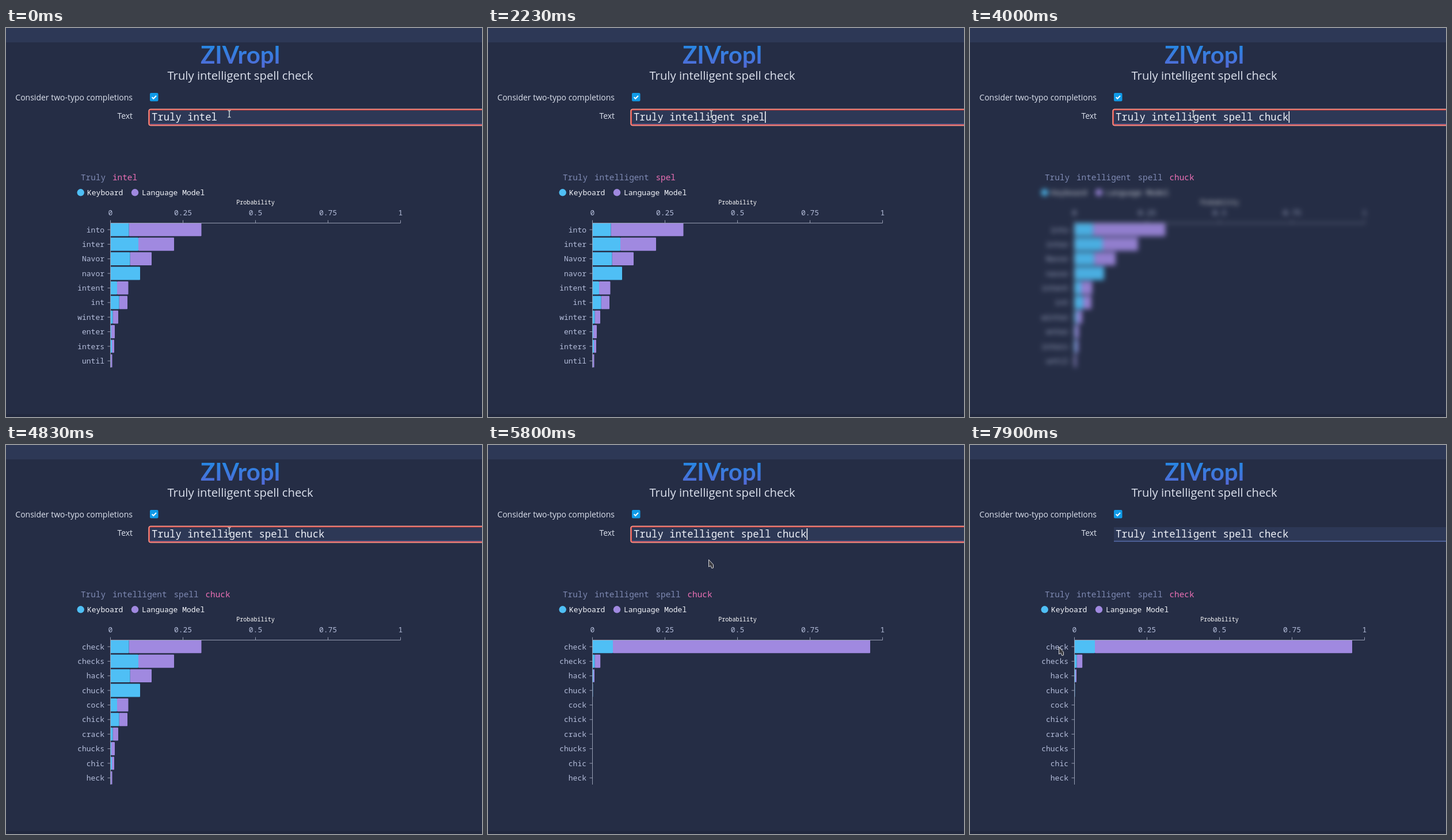
These frames come from a looping animation (827x677 px, 8000 ms). An HTML page:

```html
<!DOCTYPE html>
<html lang="en">
<head>
<meta charset="utf-8">
<title>Spell check demo</title>
<style>
  html, body { margin: 0; width: 100%; height: 100%; overflow: hidden; background: #252d45; }
  svg { display: block; width: 827px; height: 677px; }
  text { white-space: pre; }
  .sans { font-family: "Open Sans", "Noto Sans", sans-serif; fill: #dde2ee; }
  .mono { font-family: "Noto Sans Mono", "DejaVu Sans Mono", monospace; }
  .axis { font-size: 13px; fill: #b5bedb; }
  .legend { font-size: 13px; fill: #f3f5fb; }
  .rule { stroke: #969db2; fill: none; }
</style>
</head>
<body>
<svg viewBox="0 0 827 677">
  <defs>
    <linearGradient id="titleFill" gradientUnits="userSpaceOnUse" x1="0" y1="30" x2="0" y2="70">
      <stop offset="0" stop-color="#2688e4"/>
      <stop offset="1" stop-color="#5568d6"/>
    </linearGradient>
  </defs>
  <rect width="827" height="677" fill="#252d45"/>
  <rect width="827" height="25" fill="#2d3856"/>
  <rect y="672" width="827" height="5" fill="#21283e"/>

  <text x="407" y="62" text-anchor="middle" font-family="Lato, sans-serif" font-weight="700" font-size="42" fill="url(#titleFill)">ZIVropl</text>
  <text class="sans" x="407" y="89.5" text-anchor="middle" font-size="20.3">Truly intelligent spell check</text>
  <text class="sans" x="220" y="125.5" text-anchor="end" font-size="14">Consider two-typo completions</text>
  <text class="sans" x="220" y="158" text-anchor="end" font-size="14">Text</text>
  <rect x="250" y="113" width="14.5" height="14.5" rx="2" fill="#109be8"/>
  <path d="M253.6 120.4l2.6 2.6 4.8-5" fill="none" stroke="#fff" stroke-width="2"/>

  <rect x="250" y="143" width="590" height="25" fill="#2d3856"/>
  <path d="M250 167.5H827" stroke="#5a6fb0" stroke-width="1.4"/>
  <g id="ring" fill="none">
    <rect x="248.7" y="142" width="600" height="27" rx="2.5" stroke="#e4473f" stroke-width="2.6"/>
    <rect x="248" y="141.2" width="600" height="28.6" rx="3" stroke="#f5bdb4"/>
  </g>
  <text id="typed" class="mono" x="253" y="161" font-size="17.28" fill="#eef1f8"></text>
  <rect id="caret" y="145" width="1.5" height="20" fill="#fff"/>
  <g id="words" class="mono" font-size="14.33"></g>

  <g id="chart">
    <circle cx="129.7" cy="286.3" r="6.2" fill="#4fbff5"/>
    <text class="mono legend" x="141" y="291">Keyboard</text>
    <circle cx="224" cy="286.3" r="6.2" fill="#a089e0"/>
    <text class="mono legend" x="236" y="291">Language Model</text>
    <text class="mono" x="433.5" y="306.5" text-anchor="middle" font-size="10.1" font-weight="500" fill="#fff">Probability</text>
    <g id="bars"></g>
    <g id="axes"></g>
  </g>

  <path id="ibeam" d="M385.5 143.5q2.5 0 2.5 2v8q0 2-2.5 2M390.5 143.5q-2.5 0-2.5 2v8q0 2 2.5 2" fill="none" stroke="#c9d2d3" stroke-width="1.5"/>
  <path id="arrow" d="M.5 .5V13L3.6 11 5.8 15.5 8.5 14.8V9.2Z" fill="#3d3d42" stroke="#d9dade" stroke-linejoin="round"/>
</svg>
<script>
const LOOP = 8000;
const $ = id => document.getElementById(id);

function add(parent, tag, attrs, text = "") {
  const node = document.createElementNS("http://www.w3.org/2000/svg", tag);
  for (const key in attrs) node.setAttribute(key, attrs[key]);
  node.textContent = text;
  return parent.appendChild(node);
}

// Latest step [time, ...values] that has been reached.
const stepAt = (steps, t) => steps.findLast(step => step[0] <= t);
const clamp = x => Math.min(1, Math.max(0, x));
const easeInOut = x => x < .5 ? 4 * x ** 3 : 1 - (2 - 2 * x) ** 3 / 2;
const show = (node, on) => node.setAttribute("visibility", on ? "visible" : "hidden");

const PHRASE = "Truly intelligent spell chuck";
const FIXED = "Truly intelligent spell check";
const FIX_TIME = 7900;
const TYPING = [
  [0, 11], [630, 12], [800, 13], [930, 14], [1300, 15], [1400, 16], [1500, 18],
  [1730, 19], [1930, 20], [2070, 21], [2230, 22], [2430, 23], [2630, 24],
  [2830, 25], [2900, 26], [3100, 27], [3300, 28], [3530, 29]
];
const CARET = [[0, 0], [630, 1], [4470, 0], [5170, 1], [7070, 0]];
const POINTER = [
  [5770, 385, 181], [5800, 383, 199], [5870, 371, 219], [5930, 325, 248], [6070, 298, 254],
  [6470, 304, 257], [6540, 300, 261], [6600, 294, 265], [6640, 290, 269], [6700, 284, 274.5],
  [6800, 245, 301], [7000, 232, 312], [7070, 205, 326], [7130, 180, 339], [7200, 160, 348], [7230, 154, 351]
];

const LEFT = 181.5, TOP = 339.5, UNIT = 504, PITCH = 25.37;
const LABELS = [
  "into inter Navor navor intent int winter enter inters until".split(" "),
  "check checks hack chuck cock chick crack chucks chic heck".split(" ")
];
// Pixel widths: keyboard part and whole bar, before and after the update.
const KEYBOARD = [[32, 48.5, 34, 51.5, 11.5, 15, 4, 1.5, 2.5, .6], [35.5, 4, 1.5, .8]];
const TOTAL = [[158, 110.5, 71.5, 51.5, 31, 29.5, 13.5, 7.5, 6.5, 3], [482.5, 13.7, 3.5, .9]];

const rows = LABELS[0].map((_, i) => {
  const y = TOP + i * PITCH, mid = y + 11.5;
  const bar = fill => add($("bars"), "rect", { x: LEFT, y, height: 22.8, rx: 1, fill });
  const row = { model: bar("#a089e0"), keyboard: bar("#4fbff5") };
  add($("axes"), "path", { class: "rule", d: `M${LEFT - 5} ${mid}h5` });
  row.label = add($("axes"), "text", { class: "mono axis", x: 171, y: mid + 4.6, "text-anchor": "end" });
  return row;
});
add($("axes"), "path", { class: "rule", d: `M${LEFT + UNIT} ${TOP}H${LEFT}V591` });
for (const value of [0, .25, .5, .75, 1]) {
  const x = LEFT + value * UNIT;
  add($("axes"), "path", { class: "rule", d: `M${x} ${TOP}v-5` });
  add($("axes"), "text", { class: "mono axis", x, y: 325.5, "text-anchor": "middle" }, value);
}
const words = [130, 185, 291.5, 346.5].map(x => add($("words"), "text", { x, y: 265 }));

function drawText(t) {
  const count = stepAt(TYPING, t)[1];
  const text = (t < FIX_TIME ? PHRASE : FIXED).slice(0, count);
  const parts = text.split(" ");
  $("typed").textContent = text;
  words.forEach((word, i) => {
    word.textContent = parts[i] || "";
    word.setAttribute("fill", i === parts.length - 1 ? "#ec70b5" : "#7f8ab3");
  });
  $("caret").setAttribute("x", 252.9 + count * 10.37);
  show($("caret"), stepAt(CARET, t)[1]);
  $("ring").setAttribute("opacity", 1 - clamp((t - 7650) / 200));
}

function drawChart(t) {
  const blurred = t >= 4000 && t < 4830;
  $("chart").style.filter = blurred ? "blur(4px) opacity(.88)" : "none";
  const labels = LABELS[t < 4830 ? 0 : 1];
  const k = easeInOut(clamp((t - 5040) / 750));
  const mix = ([from, to], i) => from[i] + ((to[i] || 0) - from[i]) * k;
  rows.forEach((row, i) => {
    row.label.textContent = labels[i];
    const split = mix(KEYBOARD, i);
    row.keyboard.setAttribute("width", split);
    row.model.setAttribute("x", LEFT + split);
    row.model.setAttribute("width", Math.max(0, mix(TOTAL, i) - split));
  });
}

function drawPointer(t) {
  const step = stepAt(POINTER, t);
  show($("ibeam"), !step);
  show($("arrow"), step);
  if (step) $("arrow").setAttribute("transform", `translate(${step[1]} ${step[2]})`);
}

const start = performance.now();
function frame() {
  const t = (performance.now() - start) % LOOP;
  drawText(t);
  drawChart(t);
  drawPointer(t);
  requestAnimationFrame(frame);
}
frame();
</script>
</body>
</html>
```
